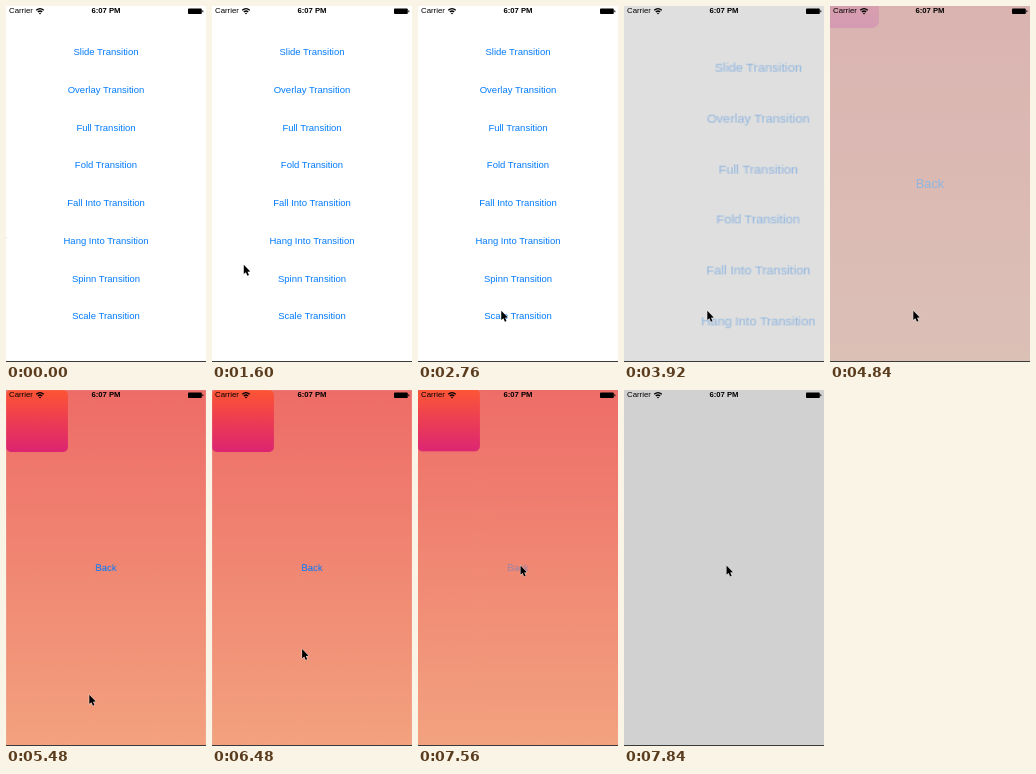
Animation, 200 px wide and 356 px high, one loop 8000 ms. Source, as an HTML page:

```html
<!DOCTYPE html>
<html lang="en">
<head>
<meta charset="utf-8">
<title>Scale transition</title>
<style>
  html, body { margin: 0; width: 100%; height: 100%; overflow: hidden; background: #d1d1d1; }
  #stage {
    position: absolute; left: 0; top: 0; width: 200px; height: 356px; overflow: hidden;
    background: #d1d1d1; font: 9.5px/12px "Liberation Sans", Arial, sans-serif;
  }
  .view { position: absolute; inset: 0; will-change: transform, opacity; }
  #menu { background: #fff; transform-origin: 0 0; }
  #detail { background: linear-gradient(#ee6c67, #f3a27f); transform-origin: 50% 50%; }
  .button {
    position: absolute; left: 0; width: 200px; height: 12px;
    text-align: center; white-space: nowrap; color: #007aff;
  }
  #tile {
    position: absolute; left: 0; top: 0; width: 62px; height: 62px; border-radius: 5px;
    background: linear-gradient(#fd5534, #dc2472);
  }
  .status { position: absolute; top: 0; line-height: 10px; color: #000; white-space: nowrap; }
  #carrier { left: 3px; font-size: 7.8px; }
  #clock { left: 0; width: 200px; text-align: center; font-size: 7.7px; font-weight: bold; }
  svg { position: absolute; left: 0; top: 0; overflow: visible; }
  #edge { position: absolute; left: 0; bottom: 0; width: 200px; height: 1px; background: #3a3a3a; }
</style>
</head>
<body>
<div id="stage">
  <div id="menu" class="view"></div>
  <div id="detail" class="view">
    <div id="tile"></div>
    <div id="back" class="button" style="top:172px">Back</div>
  </div>
  <div id="edge"></div>
  <div id="carrier" class="status">Carrier</div>
  <div id="clock" class="status">6:07 PM</div>
  <svg width="200" height="356">
    <g fill="none" stroke="#000" stroke-width="1.3">
      <path d="M30.2 4.3Q34 .9 37.8 4.3"/>
      <path d="M31.8 6Q34 4.1 36.2 6"/>
    </g>
    <path d="M32.8 7.1Q34 6.2 35.2 7.1L34 8.4Z"/>
    <rect x="182" y="2.6" width="13.8" height="5.4" rx=".9"/>
    <rect x="196.3" y="4.3" width="1" height="2" rx=".5"/>
    <path id="cursor" d="M0 0V9.3L2.1 7.4 3.6 10.9 5.2 10.2 3.7 6.9 6.5 6.7Z"
          stroke="#fff" stroke-width=".8" paint-order="stroke"/>
  </svg>
</div>
<script>
const LOOP = 8000, FADE = 300, GROW = 0.5;
const $ = id => document.getElementById(id);
const menu = $('menu'), detail = $('detail'), back = $('back'), cursor = $('cursor');

const labels = ['Slide', 'Overlay', 'Full', 'Fold', 'Fall Into', 'Hang Into', 'Spinn', 'Scale'];
const buttons = labels.map((label, i) => {
  const b = document.createElement('div');
  b.className = 'button';
  b.textContent = label + ' Transition';
  b.style.top = 40.2 + i * 37.72 + 'px';
  menu.append(b);
  return b;
});
const scaleButton = buttons[buttons.length - 1];

const part = (t, start, length) => Math.min(1, Math.max(0, (t - start) / length));
const mix = (a, b, p) => a + (b - a) * p;
const easeOut = p => 1 - (1 - p) ** 3;
const smooth = p => p * p * (3 - 2 * p);

// cubic-bezier(.42, 0, .58, 1), solved by bisection
function easeInOut(x) {
  let lo = 0, hi = 1;
  for (let i = 0; i < 20; i++) {
    const s = (lo + hi) / 2, r = 1 - s;
    if (1.26 * r * r * s + 1.74 * r * s * s + s ** 3 < x) lo = s; else hi = s;
  }
  return smooth(lo);
}

// shown: 1 is in place, 0 is enlarged and transparent
function place(view, shown) {
  view.style.opacity = shown;
  view.style.visibility = shown > 0 ? 'visible' : 'hidden';
  view.style.transform = `scale(${1 + GROW * (1 - shown)})`;
}

function moveCursor(t) {
  const enter = easeOut(part(t, 1400, 1200));
  const lift = smooth(part(t, 6100, 950));
  const x = mix(mix(-6, 83.3, enter), 102.5, lift);
  const y = mix(mix(225, 304.8, enter), 175.5, lift);
  cursor.setAttribute('transform', `translate(${x} ${y})`);
}

function draw(t) {
  const leave = easeInOut(part(t, 3738, FADE));
  const arrive = easeInOut(part(t, 4725, FADE));
  const close = easeInOut(part(t, 7538, FADE));
  place(menu, 1 - leave);
  place(detail, arrive - close);
  scaleButton.style.opacity = t >= 3720 ? 0.3 : 1;
  back.style.opacity = t >= 7520 ? 0.35 : 1;
  moveCursor(t);
}

const begin = performance.now();
function tick() {
  draw((performance.now() - begin) % LOOP);
  requestAnimationFrame(tick);
}
tick();
</script>
</body>
</html>
```
